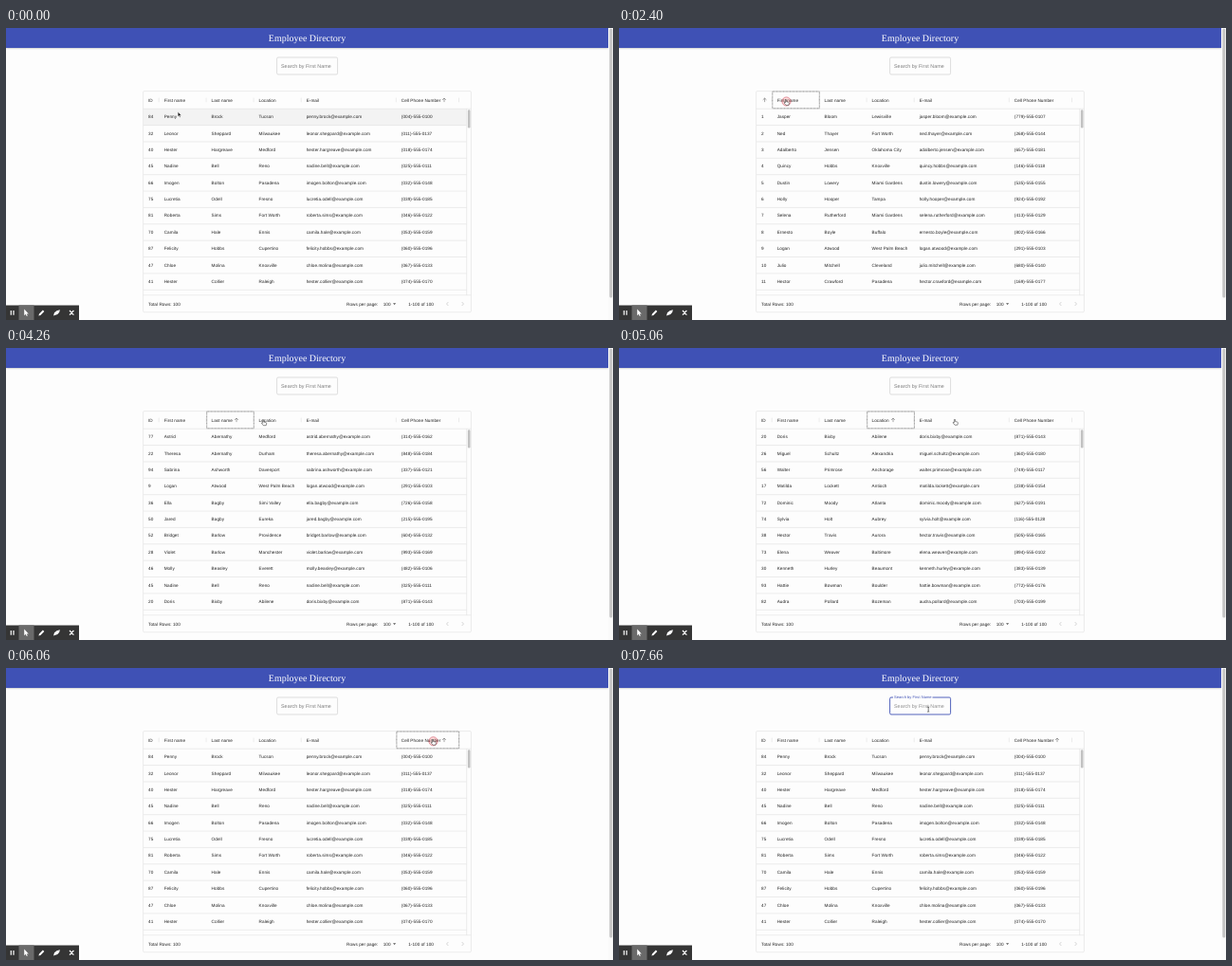
These frames come from a looping animation (640 by 308 pixels, 8000 ms). An HTML page:

```html
<!DOCTYPE html>
<html lang="en">
<head>
<meta charset="utf-8">
<title>Employee Directory</title>
<style>
  html, body { margin: 0; width: 100%; height: 100%; overflow: hidden; background: #fdfdfd; }
  svg { display: block; width: 640px; height: 308px; }
  text { font: 4.68px "Liberation Sans", Arial, sans-serif; letter-spacing: .0107em; fill: #212121; text-rendering: geometricPrecision; }
  .title { font: 10px "Liberation Serif", "Times New Roman", serif; letter-spacing: 0; fill: #fff; }
  .bar { fill: #3f51b5; filter: drop-shadow(0 .9px 1.1px #0006); }
  .line { fill: none; stroke: #e0e0e0; stroke-width: .6; }
  .icon { fill: none; stroke: #fff; stroke-width: 1.2; }
  .hint { font-size: 5.344px; fill: #8c8c8c; }
  #focus { fill: none; stroke: #555; stroke-width: .6; stroke-dasharray: 1 .4; }
  #arrow { fill: none; stroke: #777; stroke-width: .65; }
  #ring { fill: #f002; stroke: #c8324699; stroke-width: .8; }
</style>
</head>
<body>
<svg viewBox="0 0 640 308">
  <rect class="bar" width="635" height="21"/>
  <text class="title" x="317.5" y="14.3" text-anchor="middle">Employee Directory</text>
  <rect x="635" width="5" height="308" fill="#fafafa"/>
  <rect x="636.3" y=".5" width="3" height="284" rx="1.5" fill="#c4c4c4"/>

  <rect id="box" x="285.6" y="31" width="64" height="18" rx="1.4" fill="none"/>
  <rect id="gap" x="289" y="30" height="2" fill="#fdfdfd"/>
  <text id="place" class="hint" x="290" y="41.8">Search by First Name</text>
  <text id="label" x="290">Search by First Name</text>
  <path id="caret" d="M290.2 37v6" stroke="#222" stroke-width=".5"/>

  <rect class="line" x="144.6" y="66.6" width="345.8" height="233.2" rx="1.3"/>
  <g id="head"></g>
  <g id="rows"></g>
  <path class="line" d="M144.6 85.2H490.4M144.6 281.8H490.4M485.7 85.2V281.8"/>
  <rect x="486.9" y="86.3" width="2.6" height="19.2" rx="1.3" fill="#c1c1c1"/>
  <path id="arrow" d="M0 78.1V74M-1.9 75.9L0 74L1.9 75.9"/>
  <rect id="focus" y="67" height="17.8"/>

  <text x="150" y="292.7">Total Rows: 100</text>
  <text x="359" y="292.7">Rows per page:</text>
  <text x="397.7" y="292.7">100</text>
  <path d="M408 290.3h3.2l-1.6 1.7z" fill="#555"/>
  <text x="424.2" y="292.7">1-100 of 100</text>
  <path d="M466.4 289l-1.9 2 1.9 2M480.6 289l1.9 2-1.9 2" fill="none" stroke="#bbb" stroke-width=".6"/>

  <path d="M0 292.4H77V308H0z" fill="#353535"/>
  <path d="M13.5 292.4H29.5V308H13.5z" fill="#6a6a6a"/>
  <path class="icon" d="M5.3 298v4.8M8 298v4.8M67 298l4.4 4.6M71.4 298L67 302.6"/>
  <path d="M19.2 296.6v6.6l1.5-1.4 1.1 2.3 1-.5-1.1-2.2h2.1z
    M34.4 303.5l.6-2 3.9-3.9 1.4 1.4-3.9 3.9z
    M50 303.6l1-3.4q2-2.6 5.9-3-.3 3.4-2.6 4.8z" fill="#fff"/>

  <circle id="ring" r="4.6"/>
  <path id="cursor" stroke-linejoin="round"/>
</svg>
<script>
const LOOP = 8000, STEP = 200 / 3, ROW = 17.37, TOP = 85.2;
const $ = id => document.getElementById(id);
const set = (id, attrs) => { for (const k in attrs) $(id).setAttribute(k, attrs[k]); };

// id, first name, last name, city; the first eleven have the lowest numbers
const people = `84,Penny,Brock,Tucson
32,Leonor,Sheppard,Milwaukee
40,Hester,Hargreave,Medford
45,Nadine,Bell,Reno
66,Imogen,Bolton,Pasadena
75,Lucretia,Odell,Fresno
81,Roberta,Sims,Fort Worth
70,Camila,Hale,Ennis
87,Felicity,Hobbs,Cupertino
47,Chloe,Molina,Knoxville
41,Hester,Collier,Raleigh
1,Jasper,Bloom,Lewisville
2,Ned,Thayer,Fort Worth
3,Adalberto,Jensen,Oklahoma City
4,Quincy,Hobbs,Knoxville
5,Dustin,Lowery,Miami Gardens
6,Holly,Hooper,Tampa
7,Selena,Rutherford,Miami Gardens
8,Ernesto,Boyle,Buffalo
9,Logan,Atwood,West Palm Beach
10,Julio,Mitchell,Cleveland
11,Hector,Crawford,Pasadena
95,Agatha,Tanner,Tallahassee
79,Alicia,Humphrey,Cape Fear
76,Amy,Keller,St. Cloud
15,Angela,Ellis,Houston
77,Astrid,Abernathy,Medford
82,Audra,Pollard,Bozeman
53,Basil,Welch,Rochmond
51,Beatriz,Farrell,Springfield
14,Bethan,Ortiz,Phoenix
34,Bridget,Dalton,Centennial
22,Theresa,Abernathy,Durham
94,Sabrina,Ashworth,Davenport
36,Ella,Bagby,Simi Valley
50,Jared,Bagby,Eureka
52,Bridget,Barlow,Providence
28,Violet,Barlow,Manchester
46,Molly,Beasley,Everett
20,Doris,Bixby,Abilene
26,Miguel,Schultz,Alexandria
56,Walter,Primrose,Anchorage
17,Matilda,Lockett,Antioch
72,Dominic,Moody,Atlanta
74,Sylvia,Holt,Aubrey
38,Hector,Travis,Aurora
73,Elena,Weaver,Baltimore
30,Kenneth,Hurley,Beaumont
93,Hattie,Bowman,Boulder`.split('\n').map((line, i) => {
  const [id, first, last, city] = line.split(',');
  const area = i < 11 ? 4 + 7 * i : 100 + i * 389 % 900;
  return [+id, first, last, city, `${first}.${last}@example.com`.toLowerCase(),
    `(${String(area).padStart(3, 0)})-555-0${100 + i * 37 % 100}`];
});

const titles = ['ID', 'First name', 'Last name', 'Location', 'E-mail', 'Cell Phone Number'];
const edges = [145, 161.7, 211.6, 261.6, 311.7, 411.8, 478];
const arrowX = [153.6, 193.5, 243, 289, 0, 462];
const text = (col, y, s) => `<text x="${edges[col] + 5}" y="${y}">${s}</text>`;

// Each sort is stable, so ties keep the order of the column sorted before.
const views = {};
let list = people;
for (const c of [0, 1, 2, 3, 5]) {
  list = [...list].sort((a, b) => a[c] < b[c] ? -1 : a[c] > b[c] ? 1 : 0);
  views[c] = list.slice(0, 11).map((p, i) => {
    const y = TOP + ROW * i;
    return p.map((s, col) => text(col, y + 10, s)).join('') +
      `<path class="line" d="M145 ${y + ROW}H485.7"/>`;
  }).join('');
}

// column, press and release times
const clicks = [[0, 1000, 1260], [1, 2330, 2660], [2, 3530, 3930], [3, 4530, 4800], [5, 5800, 6130]];
const FIELD = 6930;

// time, x, y of the pointer
const path = [[130, 181.2, 88.6], [930, 155.8, 75.8], [1860, 155.8, 75.8], [2200, 176, 75.5],
  [2660, 176, 75.5], [2730, 181, 76], [3000, 181, 76], [3200, 234.5, 76.5], [4130, 234.5, 76.5],
  [4266, 271.3, 75.8], [4400, 274, 76], [4930, 274, 76], [5066, 354, 75.3], [5400, 450, 75.3],
  [6400, 450, 75.3], [6860, 303, 37], [7260, 303, 37], [7330, 326.2, 43.5]];

const shapes = {
  arrow: 'M0 0v5l1.2-1.1.8 1.8.9-.4-.8-1.7h1.7z',
  hand: 'M-.6.2q.6-.6 1.1 0v2l2.3.6q.7.3.6 1l-.5 2.1h-2.9l-1.8-2.3q0-.8.8-.5l.4.4z',
  beam: 'M-1-2.6q1 0 1 .7 0-.7 1-.7M0-1.9v4M-1 2.8q1 0 1-.7 0 .7 1 .7'
};

function pointer(t) {
  const k = path.findIndex(p => p[0] > t);
  if (k === 0) return path[0].slice(1);
  if (k < 0) return path[path.length - 1].slice(1);
  const [t0, x0, y0] = path[k - 1], [t1, x1, y1] = path[k];
  const u = (t - t0) / (t1 - t0), e = u * u * (3 - 2 * u);
  return [x0 + (x1 - x0) * e, y0 + (y1 - y0) * e];
}

let shown;
function drawTable(sort, hover) {
  if (shown === sort + '/' + hover) return;
  shown = sort + '/' + hover;
  $('rows').innerHTML = (hover ? `<path d="M145 ${TOP}H485.7v${ROW}H145z" fill="#f3f3f3"/>` : '') + views[sort];
  $('head').innerHTML = titles.map((s, c) =>
    (c || sort ? text(c, 77.5, s) : '') +
    `<path class="line" d="M${edges[c + 1] - .5} 73.6v4.6"/>`).join('');
  set('arrow', { transform: `translate(${arrowX[sort]})` });
}

function drawField(t) {
  const on = t >= FIELD, p = on ? Math.min(1, (t - FIELD) / 200) : 0;
  set('box', { stroke: on ? '#3f51b5' : '#c8c8c8', 'stroke-width': on ? .9 : .6 });
  set('gap', { width: 41.5 * p });
  set('place', { opacity: p });
  set('label', {
    y: 41.8 - 9.8 * p,
    style: `font-size:${5.344 * (1 - p / 4)}px;fill:${on ? '#3f51b5' : '#7a7a7a'}`
  });
  set('caret', { opacity: t > 7060 && t < 7590 ? 1 : 0 });
}

function draw(now) {
  const t = Math.floor((now % LOOP + 7) / STEP) * STEP;
  const pressed = clicks.filter(c => t >= c[1]).pop();
  const sorted = clicks.filter(c => t >= c[1] + 130).pop();
  drawTable(sorted ? sorted[0] : 5, t < 999);
  drawField(t);

  const focused = pressed && t < FIELD;
  set('focus', { opacity: focused ? 1 : 0 });
  if (focused) {
    const c = pressed[0];
    set('focus', { x: edges[c] + .1, width: edges[c + 1] - edges[c] - .4 });
  }

  const [x, y] = pointer(t);
  const kind = y > 67 && y < 85 ? 'hand' : y < 49 && y > 31 ? 'beam' : 'arrow';
  const beam = kind === 'beam';
  set('cursor', {
    d: shapes[kind], transform: `translate(${x} ${y})`,
    fill: beam ? 'none' : kind === 'hand' ? '#fff' : '#111',
    stroke: kind === 'arrow' ? '#fff' : '#222', 'stroke-width': beam ? .6 : .5
  });
  set('ring', { cx: x + .5, cy: y + 2, opacity: pressed && t < pressed[2] ? 1 : 0 });
  requestAnimationFrame(tick);
}

const start = performance.now();
const tick = () => draw(performance.now() - start);
tick();
</script>
</body>
</html>
```
